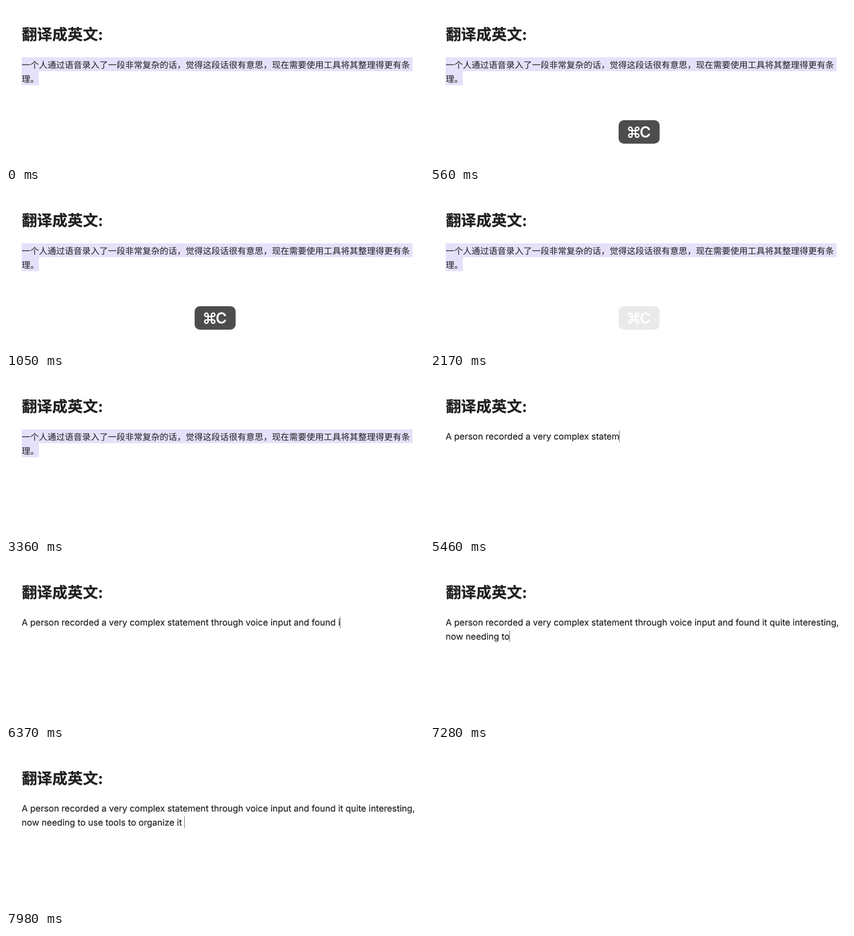
These frames come from a looping animation (800 px wide and 303 px high, 8000 ms). An HTML page:

```html
<!DOCTYPE html>
<html lang="zh-CN">
<head>
<meta charset="utf-8">
<title>翻译成英文</title>
<style>
  html, body { margin: 0; width: 100%; height: 100%; overflow: hidden; background: #fff; }
  svg { display: block; }
  text {
    font-family: Inter, "Noto Sans CJK SC", "Noto Sans CJK", sans-serif;
    font-size: 16.53px;
    fill: #1f1f21;
    white-space: pre;
    text-rendering: geometricPrecision;
  }
  .title { font-size: 29.2px; font-weight: 700; stroke: #1f1f21; stroke-width: .3; }
  .latin { font-size: 16.81px; stroke: #1f1f21; stroke-width: .2; }
  .key { font-size: 29px; font-weight: 600; fill: #fff; text-anchor: middle; }
  .sel { fill: #e6e0fa; }
  .caret { fill: #6a6a6a; }
</style>
</head>
<body>
<svg width="800" height="303" viewBox="0 0 800 303">
  <text class="title" x="30.2" y="65.4">翻译成英文:</text>

  <g id="chinese">
    <path class="sel" d="M30 98.5H778V125H63V152H30Z"/>
    <text x="30" y="119">一个人通过语音录入了一段非常复杂的话，觉得这段话很有意思，现在需要使用工具将其整理得更有条</text>
    <text x="30" y="145.5">理。</text>
  </g>

  <g id="english">
    <text class="latin" x="30" y="118.4"></text>
    <text class="latin" x="30" y="145"></text>
    <rect class="caret" id="caret" width="1" height="22"/>
  </g>

  <g id="badge">
    <rect x="361" y="219" width="78.5" height="45" rx="10" fill="#4d4d4d"/>
    <path id="command" transform="translate(390 242)" fill="none" stroke="#fff" stroke-width="2.6"/>
    <text class="key" x="412" y="252.3">C</text>
  </g>
</svg>
<script>
const LOOP = 8000, TICK = 70;
const BADGE_ON = 70, TYPE_FIRST = 3990, TYPE_REST = 4480;
const LINES = [
  "A person recorded a very complex statement through voice input and found it quite interesting, ",
  "now needing to use tools to organize it and make it more structured."
];
// Badge fade-out: [time, opacity]
const FADE = [[2030, .88], [2100, .45], [2170, .11], [2240, .03], [2310, 0]];

const $ = id => document.getElementById(id);
const chinese = $("chinese"), english = $("english"), badge = $("badge"), caret = $("caret");
const rows = english.querySelectorAll("text");

function commandPath(s, r) {
  const o = s + r, arc = `A${r} ${r} 0 1 1 `;
  return `M${-s} ${-o}V${o}${arc}${-o} ${s}H${o}${arc}${s} ${o}` +
         `V${-o}${arc}${o} ${-s}H${-o}${arc}${-s} ${-o}Z`;
}

function badgeOpacity(t) {
  if (t < BADGE_ON) return 0;
  return FADE.reduce((value, [time, opacity]) => t >= time ? opacity : value, 1);
}

// Eight characters arrive every three ticks.
function typedCount(t) {
  if (t < TYPE_REST) return 1;
  return Math.ceil(31 + (Math.floor(t / TICK) - 75) * 8 / 3);
}

function type(count) {
  const split = LINES[0].length;
  rows[0].textContent = LINES[0].slice(0, count);
  rows[1].textContent = LINES[1].slice(0, Math.max(0, count - split));
  const row = count > split ? 1 : 0;
  const x = 30 + rows[row].getComputedTextLength();
  caret.setAttribute("x", Math.min(783, Math.floor(x)));
  caret.setAttribute("y", row ? 127.5 : 101);
}

let shown = -1;
function draw(t) {
  const typing = t >= TYPE_FIRST;
  chinese.style.display = typing ? "none" : "";
  english.style.display = typing ? "" : "none";
  badge.style.opacity = badgeOpacity(t);
  const count = typing ? typedCount(t) : 0;
  if (count !== shown && typing) type(count);
  shown = count;
}

$("command").setAttribute("d", commandPath(3.25, 3.25));
const start = performance.now();
function frame() {
  draw((performance.now() - start) % LOOP);
  requestAnimationFrame(frame);
}
draw(0);
requestAnimationFrame(frame);
</script>
</body>
</html>
```
